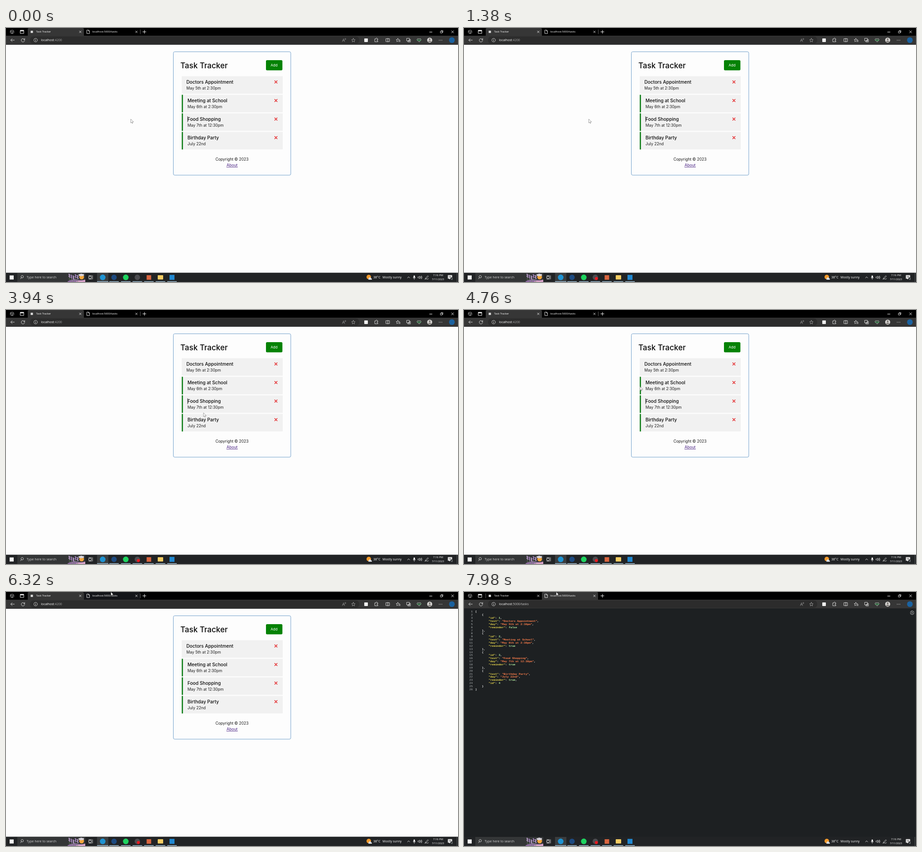
Recreate the animation shown at these times as an HTML page with a canvas. Size 998 by 561 pixels, loop 8000 ms.

```html
<!DOCTYPE html>
<html lang="en">
<head>
<meta charset="utf-8">
<title>Task Tracker</title>
<style>
html, body { margin: 0; width: 100%; height: 100%; overflow: hidden; background: #000; }
canvas { display: block; width: 998px; height: 561px; }
</style>
</head>
<body>
<canvas id="stage"></canvas>
<script>
const W = 998, H = 561, LOOP = 8000;
const UI = '"Open Sans", sans-serif';
const PAGE = 'Inter, sans-serif';
const MONO = '"Liberation Mono", monospace';
const SWITCH_AT = 6420, RECORD_AT = 300, CARET_END = 4800;

const canvas = document.getElementById('stage');
const ctx = canvas.getContext('2d');
const dpr = window.devicePixelRatio || 1;
canvas.width = W * dpr;
canvas.height = H * dpr;

const tasks = [
  { id: 1, text: 'Doctors Appointment', day: 'May 5th at 2:30pm', reminder: false },
  { id: 2, text: 'Meeting at School', day: 'May 6th at 2:30pm', reminder: true },
  { id: 3, text: 'Food Shopping', day: 'May 7th at 12:30pm', reminder: true },
  { text: 'Birthday Party', day: 'July 22nd', reminder: true, id: 4 }
];
const jsonLines = JSON.stringify(tasks, null, 4).split('\n');

// Pointer stops: time, x, y
const stops = [
  [0, 275.5, 201.5], [1600, 275.5, 201.5], [2900, 436, 227.5], [4300, 436, 227.5],
  [5500, 292, 51], [5640, 292, 51], [6250, 231.5, 0], [6800, 231.5, 0], [7700, 203.5, 0], [LOOP, 203.5, 0]
];

function rect(x, y, w, h, fill, r = 0) {
  ctx.fillStyle = fill;
  ctx.beginPath();
  ctx.roundRect(x, y, w, h, r);
  ctx.fill();
}

function dot(x, y, r, fill) {
  ctx.fillStyle = fill;
  ctx.beginPath();
  ctx.arc(x, y, r, 0, 7);
  ctx.fill();
}

// cy is the middle of the capitals
function text(s, x, cy, size, color, font = UI, weight = 500, align = 'left') {
  ctx.font = `${weight} ${size}px ${font}`;
  ctx.textAlign = align;
  ctx.fillStyle = color;
  ctx.fillText(s, x, cy + size * 0.36);
}

// Path drawn around its own centre
function icon(d, x, y, color = '#e4e4e4', w = 0.9, fill) {
  const path = new Path2D(d);
  ctx.save();
  ctx.translate(x, y);
  ctx.lineWidth = w;
  ctx.lineCap = ctx.lineJoin = 'round';
  if (fill) { ctx.fillStyle = fill; ctx.fill(path); }
  ctx.strokeStyle = color;
  ctx.stroke(path);
  ctx.restore();
}

const CROSS = 'M-2-2L2 2M2-2L-2 2';
const STAR = 'M0-4L1.2-1.3 4-1 1.9 1 2.5 4 0 2.4-2.5 4-1.9 1-4-1-1.2-1.3Z';
const PAGE_ICON = 'M-2.7-3.8H.8L2.8-1.8V3.8H-2.7ZM.8-3.8V-1.8H2.8';
const RING = 'M4 0A4 4 0 1 1-4 0A4 4 0 1 1 4 0';

function drawTabs(second, hover) {
  rect(0, 0, W, 18, '#000');
  if (hover) rect(172, 0, 124, 17, '#141519', [3, 3, 0, 0]);
  rect(second ? 172 : 48, 0, 124, 18, '#363636', [3, 3, 0, 0]);
  rect(second ? 47.5 : 296, 3.5, 0.8, 10, '#777');

  icon('M-3.6-2L0-4 3.6-2V2L0 4-3.6 2ZM-3.6-2L0 0V4M0 0L2-1', 13.5, 8.5, '#ddd', 0.8);
  icon('M-3.7-3.5H3.7V3.5H-3.7Z', 35.5, 8.5, '#eee', 1);
  rect(32, 5, 7, 2.2, '#eee');

  rect(54.5, 6, 5, 5, '#d8d8d8');
  text('Task Tracker', 66.5, 8.2, 5.75, '#fff');
  icon(CROSS, 164, 8.5, '#f0f0f0', 0.9);
  icon(PAGE_ICON, 181.5, 8.5, '#f0f0f0', 0.9);
  text('localhost:5000/tasks', 190.5, 8.2, 5.85, '#fff');
  icon(CROSS, 288, 8.5, '#f0f0f0', 0.9);
  icon('M-3.5 0H3.5M0-3.5V3.5', 305.5, 8.5, '#eee', 1);

  icon('M-2.8.5H2.8', 938, 8.5, '#fff', 1);
  icon('M-2.5-1H1.3V2.8H-2.5ZM-1-1V-2.5H2.7V1.2H1.3', 962, 8.2, '#fff', 0.8);
  icon('M-2.5-2.5L2.5 2.5M2.5-2.5L-2.5 2.5', 986, 8.5, '#fff', 0.9);
}

function drawToolbar(second) {
  rect(0, 17, W, 19, '#363636');
  rect(0, 36, W, 1, '#202224');
  rect(53, 18.5, 727, 16.5, '#2c2c2c', 8);
  icon('M4 0H-4M-.8-3.2L-4 0-.8 3.2', 14.5, 26.8);
  icon('M3.6-1A3.8 3.8 0 1 0 3.8.8M3.8-3.6V-1H1.2', 37.5, 26.8);
  icon(RING, 65.5, 26.8, '#ddd', 0.8);
  icon('M0-.4V2M0-2V-1.9', 65.5, 26.8, '#ddd', 0.9);

  text('localhost', 77.3, 26.4, 6.9, '#fff');
  const host = ctx.measureText('localhost').width;
  text(second ? ':5000/tasks' : ':4200', 77.3 + host, 26.4, 6.9, second ? '#c8c8c8' : '#a8a8a8', UI, 400);

  icon('M-3.4 3.2L-.8-3 1.8 3.2M-2.6 1.2H1M2.4-3.4Q3.4-2.4 2.4-1.2M3.7-4Q5.2-2.4 3.7-.8', 746, 26.8, '#aaa', 0.7);
  icon(STAR, 767, 26.8, '#aaa', 0.8);
  rect(791, 23, 8, 8, '#eee', 1);
  icon('M-3.4-2.8H-1A1.3 1.3 0 1 1 1.3-2.8H3V-.8A1.3 1.3 0 1 0 3 1.6V3.6H-3.4Z', 818, 26.8);
  icon('M-3.8-3.2H3.8V3.2H-3.8ZM0-4V4', 843, 26.8);
  icon('M-1.3-3.8L-.2-1.4 2.4-1.1M-1.3-3.8L-2.4-1.4-5-1.1-3.1.7-3.6 3.4-1.3 2M.3.8H4M.3 3H4', 866.5, 26.8);
  icon('M-4-4H1.8V1.6H-4ZM-1.8 1.6V4H4V-1.6H1.8M1.1-.8V2.8M-.8 1H2.9', 889, 26.8);
  icon('M0 3.7L-3.7.2C-5.5-3-1.5-4.8 0-2C1.5-4.8 5.5-3 3.7.2Z', 912, 26.8, '#cfe3d2', 0.9);
  icon('M-4.2 0H-1.5L-.4-1.5 1 1.4 2 0H4.2', 912, 27, '#37b75a', 1);
  dot(935.5, 26.8, 5.6, '#d4d2d0');
  dot(935.5, 25, 1.9, '#77736f');
  icon('M-3 1Q-3-1 0-1T3 1Z', 935.5, 29.3, '#77736f', 0.8, '#77736f');
  for (const dx of [-3, 0, 3]) dot(959.5 + dx, 27, 0.65, '#e0e0e0');
  dot(984.5, 26.8, 6.3, '#1b62a0');
}

function drawTracker(caret) {
  rect(0, 37, W, 504, '#fdfdfd');
  ctx.strokeStyle = '#6f9fcb';
  ctx.lineWidth = 1;
  ctx.beginPath();
  ctx.roundRect(369.5, 52.5, 259.3, 272.5, 3);
  ctx.stroke();

  text('Task Tracker', 385, 82.5, 17, '#0a0a0a', PAGE);
  rect(574, 71, 36.3, 22.6, '#058205', 2.5);
  text('Add', 592, 82.6, 8, '#fff', PAGE, 400, 'center');

  tasks.forEach((task, i) => {
    const y = 106.5 + i * 41;
    const x = task.reminder ? 400.8 : 398.2;
    rect(388, y, 223, 38.8, '#f1f1f1');
    if (task.reminder) rect(388, y, 2.7, 38.8, '#137f1c');
    text(task.text, x, y + 12.5, 10.2, '#0c0c0c', PAGE);
    text(task.day, x, y + 26.7, 8.6, '#1c1c1c', PAGE, 400);
    icon('M-2.7-2.7L2.7 2.7M2.7-2.7L-2.7 2.7', 596, y + 12.6, '#e3191c', 1.4);
  });
  if (caret) rect(400.6, 195, 0.9, 13, '#222');

  text('Copyright © 2023', 499, 290, 8.5, '#1a1a1a', PAGE, 400, 'center');
  text('About', 499.2, 303, 8.7, '#4b2385', PAGE, 400, 'center');
  rect(486.7, 307, 25, 0.8, '#4b2385');
}

function tokenColor(token, rest) {
  if (token[0] === '"') return rest[0] === ':' ? '#ead94f' : '#ff7f4c';
  return /\w/.test(token) ? '#b8f5a4' : '#e8e8e8';
}

function drawJson() {
  rect(0, 37, W, 504, '#1d2022');
  jsonLines.forEach((line, i) => {
    const y = 43.2 + i * 6.855;
    text(i + 1, 19.3, y, 6.2, '#b4b8ba', MONO, 400, 'right');
    for (const m of line.matchAll(/"[^"]*"|\w+|[^\s\w"]+/g)) {
      const rest = line.slice(m.index + m[0].length);
      text(m[0], 24.7 + m.index * 3.7, y, 6.2, tokenColor(m[0], rest), MONO, 700);
    }
  });
  icon('M-1-4H1L1.5-2.7 3-3 4-1.2 3 0 4 1.2 3 3 1.5 2.7 1 4H-1L-1.5 2.7-3 3-4 1.2-3 0-4-1.2-3-3-1.5-2.7Z', 989.5, 45.8, '#d4d4d4', 0.8);
  dot(989.5, 45.8, 1.1, '#d4d4d4');
}

// Lavender field with a sun in the search box
function drawSearchArt() {
  ctx.save();
  ctx.beginPath();
  ctx.rect(136, 541, 39, 20);
  ctx.clip();
  dot(167, 550, 5.2, '#f3a63b');
  for (const [x, r] of [[162, 2], [166, 3], [170, 2.2]]) dot(x, 545.5, r, '#d8d4dc');
  icon('M-20 5Q-8-2 2 1T20 1V8H-20Z', 156, 555, '#8d6a9f', 0.5, '#8d6a9f');
  icon('M-4 5Q0 1 6 1T18-1V5Z', 157, 557, '#d3a0c4', 0.5, '#d3a0c4');
  for (let i = 0; i < 5; i++) {
    const x = 139 + i * 4.6, top = 544 + (i * 7 % 5);
    rect(x + 0.5, top, 0.8, 14, '#6c8a62');
    for (let k = 0; k < 4; k++) dot(x + 0.9 + (k % 2 ? 0.6 : -0.6), top + k * 2, 1.3, i % 2 ? '#a884c4' : '#c3a3d6');
  }
  ctx.restore();
}

function drawTaskbar(recording) {
  rect(0, 540.5, W, 21, '#212325');
  rect(8, 546.5, 9, 9, '#f4f4f4');
  rect(25, 541, 150, 20, '#343637');
  icon('M1.2 1A2.7 2.7 0 1 1 1.3.9M-2.3.8L-4.4 3.6', 36.5, 550.3, '#e8e8e8', 0.9);
  text('Type here to search', 45.5, 550.8, 7.2, '#d4d4d4');
  drawSearchArt();
  icon('M-4-2.2H1.6V2.2H-4ZM-4-4.2V-3.8H1.6V-4.2M-4 4.2V3.8H1.6V4.2M4-4V4', 187, 550.8, '#e8e8e8', 0.9);

  rect(201, 541, 25, 20, '#3a3d3f');
  dot(213.5, 550.8, 6.2, '#1f93d2');
  dot(238.5, 550.8, 6, '#1d4a80');
  dot(264.5, 550.8, 6.2, '#1ed35f');
  dot(290, 550.8, 6, '#4c4c50');
  if (recording) dot(292.3, 553.3, 3.4, '#e81a20');
  rect(310.5, 546, 10, 10, '#d9653f');
  rect(335, 546, 12, 9.5, '#f5cd62', 1);
  rect(361, 545.3, 11, 11, '#2188d0');
  for (const x of [213.5, 238.5, 264.5, 290, 315.5, 341, 366.5]) {
    const half = x < 220 ? 12.5 : 10.5;
    rect(x - half, 559.3, half * 2, 1.7, '#8fa9bb');
  }

  dot(801, 550, 5, '#f39a2c');
  dot(803.5, 553.4, 2.6, '#d9dde2');
  rect(800, 553, 8, 3, '#d9dde2', 1.5);
  text('38°C', 811, 550.8, 7.1, '#fff');
  text('Mostly sunny', 831.3, 550.8, 6.85, '#fff');
  icon('M-2.5 1.2L0-1.3 2.5 1.2', 889, 550.8, '#f0f0f0', 0.9);
  rect(899.8, 546.5, 3.2, 5.5, '#f0f0f0', 1.6);
  icon('M-2.4-.6Q-2.4 2 0 2T2.4-.6M0 2V4', 901.4, 551.3, '#f0f0f0', 0.7);
  icon('M-4-1.2H-2.4L-.6-3V3L-2.4 1.2H-4ZM.8-1.4Q1.8 0 .8 1.4M2.2-2.5Q4 0 2.2 2.5M3.5-3.4Q6 0 3.5 3.4', 914, 550.8, '#f0f0f0', 0.7);
  icon('M-3 3L-2.2.8 2.4-3.8 3.8-2.4-.8 2.2ZM-4.5 4Q-1 2.6 1 3.8T4 2.4', 929, 550.8, '#f0f0f0', 0.7);
  text('7:16 PM', 954, 545.8, 5.85, '#fff', UI, 500, 'center');
  text('7/11/2023', 953.7, 555.2, 5.7, '#fff', UI, 500, 'center');
  icon('M-4.2-4H4.2V3H1L-1 4.6V3H-4.2Z', 980.5, 550.2, '#f0f0f0', 0.8, '#f0f0f0');
  rect(978, 548, 5, 0.7, '#333');
  rect(978, 550, 5, 0.7, '#333');
  dot(984.5, 554.2, 3.5, '#24282b');
  text('2', 984.5, 554.2, 5.6, '#fff', UI, 500, 'center');
  rect(995, 541, 0.8, 20, '#5a5d60');
}

function pointerAt(t) {
  const i = Math.max(1, stops.findIndex(s => s[0] > t));
  const [t0, x0, y0] = stops[i - 1], [t1, x1, y1] = stops[i];
  const u = (t - t0) / (t1 - t0), e = u * u * (3 - 2 * u);
  return [x0 + (x1 - x0) * e, y0 + (y1 - y0) * e];
}

function draw(t) {
  const second = t >= SWITCH_AT;
  const [x, y] = pointerAt(t);
  ctx.setTransform(dpr, 0, 0, dpr, 0, 0);
  if (second) drawJson();
  else drawTracker(t < CARET_END);
  drawTabs(second, !second && y < 17 && x > 172 && x < 296);
  drawToolbar(second);
  drawTaskbar(t >= RECORD_AT);
  icon('M0 0V8.2L1.9 6.4 3.2 9.3 4.5 8.7 3.2 5.9H5.8Z', x, y, y < 37 ? '#222' : '#777', 0.7, '#fff');
}

function tick() {
  draw(performance.now() % LOOP);
  requestAnimationFrame(tick);
}
tick();
</script>
</body>
</html>
```
